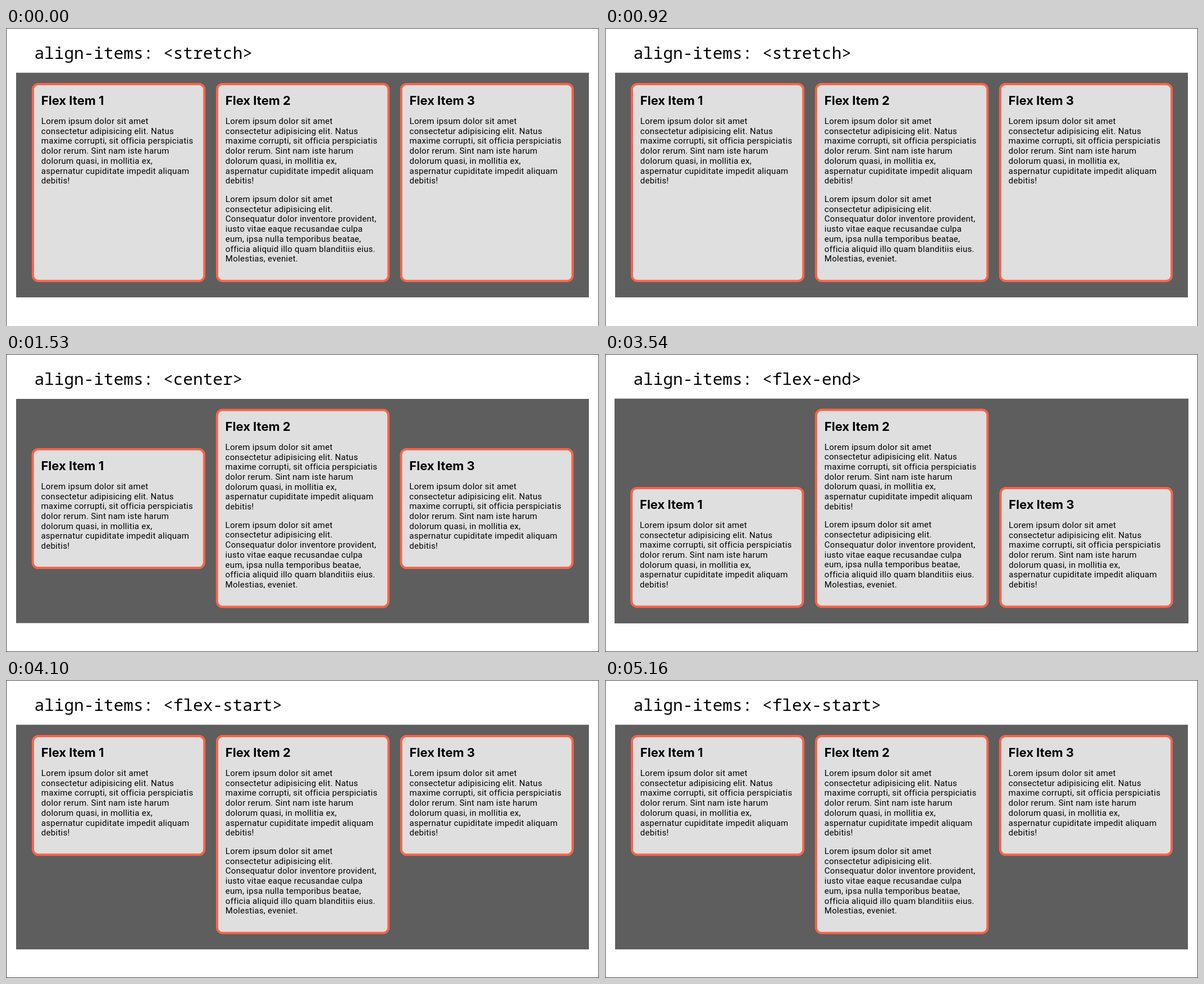
Write an HTML page that moves like this. It is 1056 px wide and 531 px high and loops after 5.87 s.

```html
<!DOCTYPE html>
<html lang="en">
<head>
<meta charset="utf-8">
<title>align-items</title>
<style>
  html, body { margin: 0; width: 100%; height: 100%; overflow: hidden; background: #fff; }
  svg { display: block; width: 1056px; height: 531px; }
  text { fill: #000; }
  .title { font: 400 29.45px "Noto Sans Mono", monospace; }
  .head { font: 700 22px Inter, sans-serif; }
  .body { font: 400 15px Roboto, sans-serif; letter-spacing: .285px; }
  .pane { fill: #5e5e5e; }
  .card { fill: #dfdfdf; stroke: #fd6448; stroke-width: 4; }
  .edge { fill: none; stroke: #444; stroke-width: 1; }
</style>
</head>
<body>
<svg id="stage" viewBox="0 0 1056 531"></svg>
<script>
const LOOP = 5870;
const LINE = 17.72;
const SHORT = 215.3;
const TALL = 354.7;

const first = [
  "Lorem ipsum dolor sit amet",
  "consectetur adipisicing elit. Natus",
  "maxime corrupti, sit officia perspiciatis",
  "dolor rerum. Sint nam iste harum",
  "dolorum quasi, in mollitia ex,",
  "aspernatur cupiditate impedit aliquam",
  "debitis!"
];
const second = [
  "Lorem ipsum dolor sit amet",
  "consectetur adipisicing elit.",
  "Consequatur dolor inventore provident,",
  "iusto vitae eaque recusandae culpa",
  "eum, ipsa nulla temporibus beatae,",
  "officia aliquid illo quam blanditiis eius.",
  "Molestias, eveniet."
];

// pane: x, y, w, h; side: top and height of the outer cards
const poses = [
  { at: 0, value: "stretch", pane: [18, 79.7, 1020, 400.3], xs: [46, 374, 701.8], side: [98, TALL], mid: 98, open: true },
  { at: 1530, value: "center", pane: [18, 80, 1020, 399.5], xs: [45.6, 373.8, 701.5], side: [167.8, SHORT], mid: 97.8 },
  { at: 2700, value: "flex-end", pane: [17, 79.5, 1022, 400.5], xs: [45.2, 374, 702.3], side: [236.9, SHORT], mid: 97.5 },
  { at: 4100, value: "flex-start", pane: [18, 79.7, 1020, 400.3], xs: [46, 374, 701.8], side: [98, SHORT], mid: 98 }
];

function add(parent, tag, attrs, text) {
  const el = document.createElementNS("http://www.w3.org/2000/svg", tag);
  for (const key in attrs) el.setAttribute(key, attrs[key]);
  if (text) el.textContent = text;
  parent.appendChild(el);
  return el;
}

function addLines(parent, lines, top) {
  lines.forEach((line, i) =>
    add(parent, "text", { class: "body", x: 16.8, y: top + i * LINE }, line));
}

function addCard(parent, n, x, y, h) {
  const g = add(parent, "g", { transform: `translate(${x} ${y})` });
  add(g, "rect", { class: "card", x: 2, y: 2, width: 305.2, height: h - 4, rx: 9.5 });
  add(g, "text", { class: "head", x: 16.8, y: 39 }, "Flex Item " + n);
  addLines(g, first, 73);
  if (n === 2) addLines(g, second, 211.9);
}

function addPose(pose) {
  const g = add(stage, "g", {});
  const [x, y, width, height] = pose.pane;
  add(g, "text", { class: "title", x: 50.4, y: 55 }, `align-items: <${pose.value}>`);
  add(g, "rect", { class: "pane", x, y, width, height });
  pose.xs.forEach((left, i) => {
    const [top, h] = i === 1 ? [pose.mid, TALL] : pose.side;
    addCard(g, i + 1, left, top, h);
  });
  add(g, "path", { class: "edge", d: "M.5 531V.5H1055.5V531" });
  if (!pose.open) add(g, "path", { class: "edge", d: "M0 530.5H1056" });
  return g;
}

const stage = document.getElementById("stage");
const views = poses.map(addPose);
const start = performance.now();

function draw(now) {
  const t = Math.max(0, now - start) % LOOP;
  const current = poses.filter(p => p.at <= t).length - 1;
  views.forEach((g, i) => g.setAttribute("display", i === current ? "inline" : "none"));
  requestAnimationFrame(draw);
}
draw(start);
</script>
</body>
</html>
```
